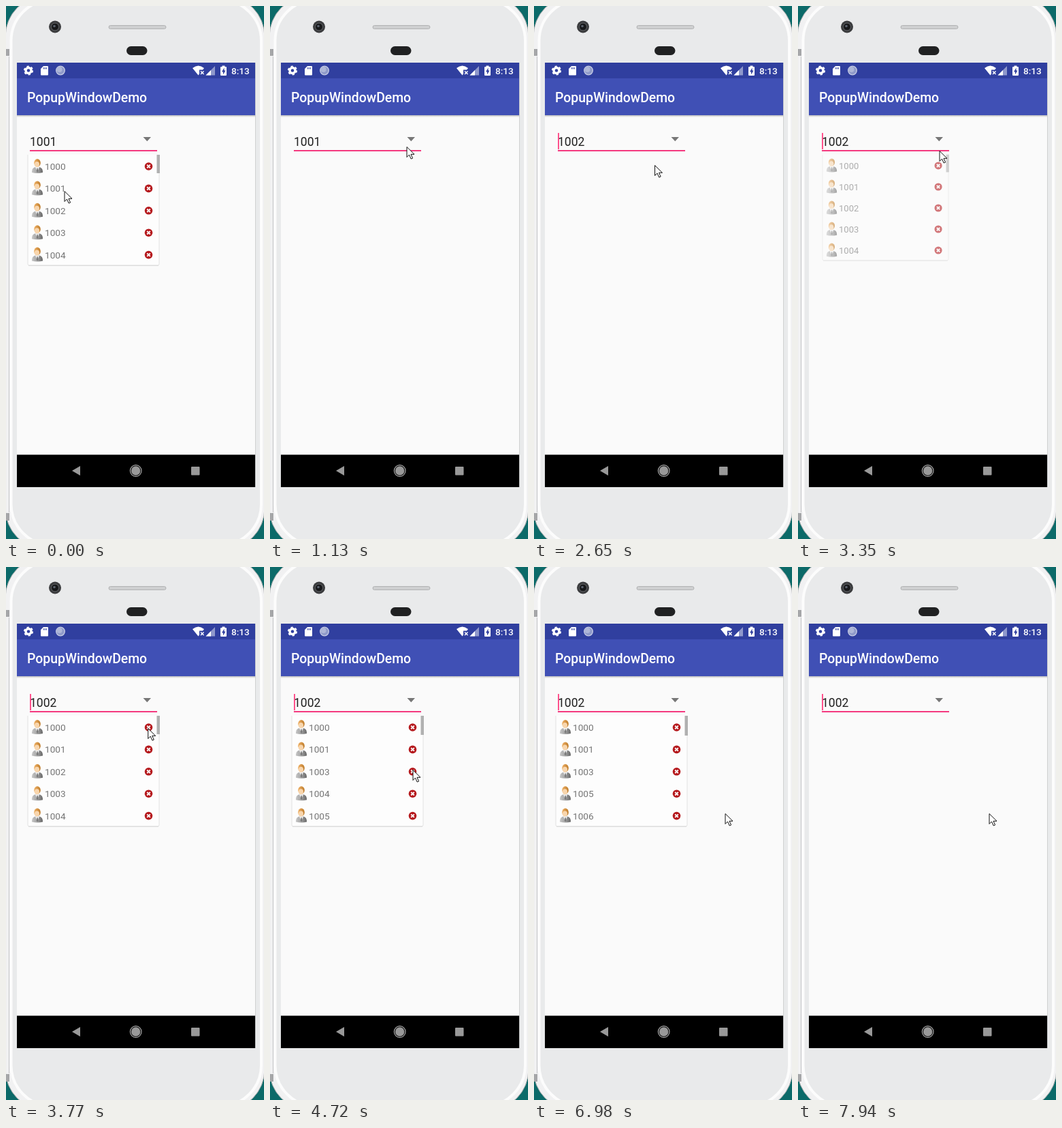
These frames come from a looping animation (379x781 px, 8 s). An HTML page:

```html
<!DOCTYPE html>
<html lang="en">
<head>
<meta charset="utf-8">
<title>Popup window demo</title>
<style>
html, body { margin: 0; width: 100%; height: 100%; overflow: hidden; background: #0c6a69; }
svg { display: block; }
text { font-family: Roboto, Arial, sans-serif; }
</style>
</head>
<body>
<svg width="379" height="781" viewBox="0 0 379 781">
  <defs>
    <linearGradient id="suit"><stop stop-color="#c6c6c6"/><stop offset=".5" stop-color="#a2a2a2"/><stop offset="1" stop-color="#666"/></linearGradient>
    <linearGradient id="hair"><stop stop-color="#f0b36a"/><stop offset="1" stop-color="#bd7a28"/></linearGradient>
    <linearGradient id="shade" x2="0" y2="1"><stop stop-color="#bcbcbc"/><stop offset="1" stop-color="#fafafa"/></linearGradient>
    <g id="person">
      <path d="M38 244C38 239 39.500 237 43 236h6c3.500 1 5 3 5 8q-8 2-16 0z" fill="url(#suit)"/>
      <path d="M43 236l3 7 3-7z" fill="#f4f4f4"/>
      <path d="M45.500 237.500h1.200l.6 4.500-1.200 2-1.200-2z" fill="#777"/>
      <ellipse cx="46" cy="229.800" rx="4.800" ry="5.800" fill="url(#hair)"/>
      <ellipse cx="45.500" cy="232" rx="3.500" ry="4" fill="#f8d6ae"/>
    </g>
    <g id="remove">
      <circle cx="209.500" cy="235" r="5.800" fill="#b5191d"/>
      <path d="M207.200 232.700l4.600 4.600m0-4.600l-4.600 4.600" stroke="#fff" stroke-width="1.900"/>
    </g>
  </defs>

  <!-- phone -->
  <rect x="-1" y="-15" width="381" height="811" rx="60" fill="#f1f1f2" stroke="#a7a9aa"/>
  <path d="M0 63h5v10H0zM0 743h5v11H0z" fill="#a5a6a8"/>
  <path d="M4.500 74V742" stroke="#c4c5c7"/>
  <rect x="7.500" y="-9" width="367.500" height="799" rx="60" fill="#e9eaeb" stroke="#fcfcfc" stroke-width="4"/>
  <circle cx="72" cy="30.500" r="9" fill="#3b3c3e"/>
  <circle cx="72" cy="30.500" r="5.500" fill="#17181a" stroke="#626468"/>
  <circle cx="71" cy="29.500" r="1.800" fill="#59616c"/>
  <rect x="151" y="28.500" width="84" height="5" rx="2.500" fill="#cfd0d1" stroke="#b2b3b4"/>
  <rect x="177" y="59" width="30.500" height="13" rx="6.500" fill="#202122"/>

  <!-- screen -->
  <path d="M16 83h350v622H16z" fill="#fafafa"/>
  <path d="M366.500 83v622" stroke="#cfd0d1"/>
  <path d="M16 160h350v3H16z" fill="url(#shade)"/>
  <path d="M16 106h350v54H16z" fill="#4050b5"/>
  <path d="M16 83h350v23H16z" fill="#303f9f"/>
  <path d="M16 657.600h350V705H16z"/>
  <text x="31" y="140.500" font-size="19.400" font-weight="500" fill="#fff">PopupWindowDemo</text>

  <!-- status bar -->
  <circle cx="33" cy="94.500" r="4" fill="none" stroke="#fff" stroke-width="3.400"/>
  <circle cx="33" cy="94.500" r="6" fill="none" stroke="#fff" stroke-width="2.200" stroke-dasharray="3.140"/>
  <path d="M55 88h6q1 0 1 1v11.500q0 1-1 1h-9q-1 0-1-1V92z" fill="#fff"/>
  <path d="M55.500 90v2.500m2-2.500v2.500m2-2.500v2.500" stroke="#303f9f"/>
  <circle cx="80" cy="94.500" r="6.300" fill="#8f9ac9" stroke="#c8cde6" stroke-width="1.300"/>
  <circle cx="78.500" cy="93" r="4" fill="#aeb7d8"/>
  <path d="M274 91q8.500-7 17 0l-2 2.500h-5v6l-1.500 2z" fill="#fff"/>
  <path d="M286 95.500l4.500 4.500m0-4.500l-4.500 4.500" stroke="#fff" stroke-width="1.500"/>
  <path d="M307 88v13.500h-13.500z" fill="#8f98cb"/>
  <path d="M301 94v7.500h-7.500z" fill="#fff"/>
  <path d="M317.500 87.500h4V89h1.500q1 0 1 1v11q0 1-1 1h-7q-1 0-1-1V90q0-1 1-1h1.500z" fill="#fff"/>
  <path d="M320.500 90.500l-3.500 6h2v4l3.500-6h-2z" fill="#303f9f"/>
  <text x="331" y="99.500" font-size="13.600" font-weight="500" fill="#fff">8:13</text>

  <!-- navigation -->
  <g fill="#999">
    <path d="M97 681l12-7v14z"/>
    <circle cx="190.700" cy="681" r="6.700"/>
    <circle cx="190.700" cy="681" r="8.300" fill="none" stroke="#aaa" stroke-width="1.200"/>
    <rect x="272" y="675" width="12.500" height="12.500" rx="1"/>
  </g>

  <!-- field -->
  <text id="field" x="35" y="204.500" font-size="17.500" fill="#212121"></text>
  <path d="M35 212h187" stroke="#f4397f" stroke-width="2"/>
  <path d="M201.500 192h11.500l-5.700 6.300z" fill="#777"/>
  <path id="caret" d="M36 186v24" stroke="#ff4081" stroke-width="1.800"/>

  <g id="popup">
    <path d="M32 218V378q0 2 2 2H223q2 0 2-2V218" fill="#fdfdfd" stroke="#e2e2e2"/>
    <path d="M33 380.300H224" stroke="#d3d3d3" stroke-width=".8"/>
    <g id="rows" font-size="13.600" fill="#757575"></g>
    <rect id="thumb" x="221.500" y="218" width="4.500" fill="#b0b0b0"/>
  </g>
  <path id="cursor" d="M0 .5V15.500L3.500 12 6.200 18 8.600 17 6 11.300H11z" fill="#fff" stroke="#111"/>
</svg>
<script>
const $ = id => document.getElementById(id);
const LOOP = 8000, ROWS = 5, PITCH = 32.4, FADE_IN = 260, FADE_OUT = 170;

const home = { x: 86, y: 271 };
const moves = [
  { from: 420, to: 850, x: 201, y: 206 },   // to the arrow
  { from: 1250, to: 1670, x: 79, y: 301 },  // to the third row
  { from: 2390, to: 2770, x: 208, y: 212 }, // back to the arrow
  { from: 3500, to: 3920, x: 209, y: 246 },
  { from: 4440, to: 4720, x: 210, y: 297 }, // to a remove button
  { from: 5260, to: 5640, x: 208, y: 332 }, // to the next one
  { from: 6560, to: 6980, x: 281, y: 361 }  // outside the popup
];
const openings = [{ open: -FADE_IN, close: 260 }, { open: 1180, close: 2230 }, { open: 3200, close: 7750 }];
const caretSpans = [[420, 850], [2390, 2770], [3200, LOOP]];
const picked = 2390;
const removals = [{ time: 4720, name: 1002 }, { time: 6040, name: 1004 }];

const progress = (t, from, length) => Math.min(1, Math.max(0, (t - from) / length));
const smooth = p => p * p * (3 - 2 * p);

function pointerAt(t) {
  return moves.reduce((pos, move) => {
    const p = smooth(progress(t, move.from, move.to - move.from));
    return { x: pos.x + (move.x - pos.x) * p, y: pos.y + (move.y - pos.y) * p };
  }, home);
}

$('rows').innerHTML = Array.from({ length: ROWS }, (_, i) =>
  `<g transform="translate(0 ${i * PITCH})"><use href="#person"/><text x="57" y="240"></text><use href="#remove"/></g>`
).join('');
const labels = [...$('rows').querySelectorAll('text')];

function draw(t) {
  const { open, close } = openings.findLast(o => o.open <= t);
  const shown = progress(t, open, FADE_IN);
  $('popup').setAttribute('opacity', shown * (1 - progress(t, close, FADE_OUT)));
  $('popup').setAttribute('transform', `translate(128.5 210) scale(${.9 + .1 * shown}) translate(-128.5 -210)`);

  const gone = removals.filter(r => r.time <= t).map(r => r.name);
  const names = Array.from({ length: 10 }, (_, i) => 1000 + i).filter(n => !gone.includes(n));
  labels.forEach((label, i) => label.textContent = names[i]);
  $('thumb').setAttribute('height', 27 + gone.length);

  $('field').textContent = t < picked ? 1001 : 1002;
  $('caret').setAttribute('opacity', +caretSpans.some(([on, off]) => on <= t && t < off));
  const { x, y } = pointerAt(t);
  $('cursor').setAttribute('transform', `translate(${x} ${y})`);
}

let start;
function tick(now) {
  start ??= now;
  draw((now - start) % LOOP);
  requestAnimationFrame(tick);
}
draw(0);
requestAnimationFrame(tick);
</script>
</body>
</html>
```
